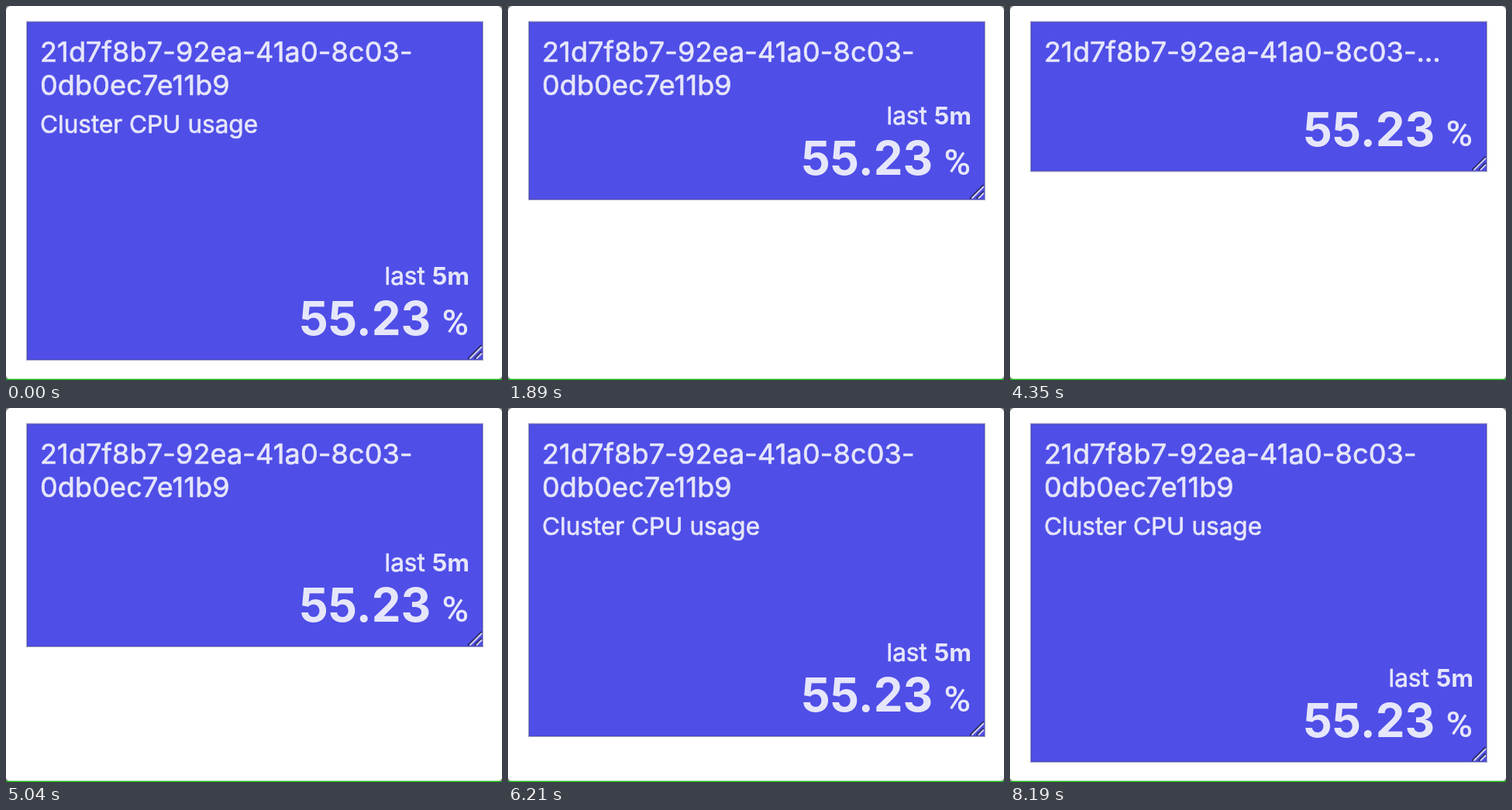
Animation, 640 px wide and 483 px high, one loop 8220 ms. Source, as an HTML page:

```html
<!DOCTYPE html>
<html lang="en">
<head>
<meta charset="utf-8">
<title>Resizable metric card</title>
<style>
  html, body { margin: 0; width: 100%; height: 100%; overflow: hidden; background: #fff; }
  svg { display: block; width: 640px; height: 483px; }
  text { font-family: Inter, sans-serif; font-optical-sizing: none; fill: #e6e6fb; stroke: #e6e6fb; stroke-width: .7px; }
  .title { font-size: 36px; letter-spacing: .15px; }
  .label { font-size: 31.5px; }
  .value { font-size: 60px; font-weight: 700; stroke: none; }
  .unit { font: 500 47px Roboto, sans-serif; stroke: none; }
  .bold { font-weight: 700; stroke: none; }
  .end { text-anchor: end; }
</style>
</head>
<body>
<svg viewBox="0 0 640 483">
  <path d="M0 0H5Q1 1 0 5ZM640 0H635Q639 1 640 5ZM0 482V478Q1 481 4 482ZM640 482V478Q639 481 636 482Z" fill="#777"/>
  <rect y="481.6" width="640" height="1.4" fill="#12b812"/>
  <rect id="card" x="27" y="20.5" width="588" fill="#4f4ee7" stroke="#44448c" stroke-opacity=".45" stroke-width="2"/>
  <text class="title" x="44" y="72">21d7f8b7-92ea-41a0-8c03-<tspan id="ellipsis">…</tspan></text>
  <text class="title" id="secondLine" x="44" y="115">0db0ec7e11b9</text>
  <text class="label" id="subtitle" x="44" y="164">Cluster CPU usage</text>
  <g id="footer">
    <text class="label end" id="period" x="598" y="-97.5">last <tspan class="bold">5m</tspan></text>
    <text class="value end" x="548.3" y="-32.5">55.23</text>
    <text class="unit end" x="597" y="-32">%</text>
    <g fill="none">
      <path d="M596 -1.5L613.5 -19M604.5 -1.5L613.5 -10.5" stroke="#2b2b62" stroke-width="1.8"/>
      <path d="M598.5 -1.5L614 -17M607 -1.5L614 -8.5" stroke="#d0d0ee" stroke-width="1.9"/>
    </g>
  </g>
</svg>
<script>
const LOOP = 8220, STEP = 30, TOP = 20.5;
const SHOW_SUBTITLE = 327, SHOW_DETAILS = 236;

// Drag path of the bottom edge: [time in ms, y]
const drag = [
  [0, 457], [780, 387], [1680, 267], [1890, 250], [2520, 216], [3060, 203],
  [3390, 199], [3600, 195], [4050, 195], [4860, 280], [5040, 308], [5700, 389],
  [6210, 424], [6540, 440], [7380, 454], [7710, 457], [LOOP, 457]
];

const el = id => document.getElementById(id);
const show = (id, visible) => el(id).setAttribute('visibility', visible ? 'visible' : 'hidden');

function tangent(i) {
  const prev = drag[i - 1], here = drag[i], next = drag[i + 1];
  if (!prev || !next || prev[1] === here[1] || next[1] === here[1]) return 0;
  return (next[1] - prev[1]) / (next[0] - prev[0]);
}

// Cubic Hermite interpolation between drag points
function bottomAt(time) {
  const i = drag.findIndex((point, k) => k > 0 && time < point[0]) - 1;
  const [t0, y0] = drag[i], [t1, y1] = drag[i + 1];
  const span = t1 - t0, u = (time - t0) / span, v = 1 - u;
  return y0 * (1 + 2 * u) * v * v + y1 * u * u * (3 - 2 * u)
    + span * u * v * (tangent(i) * v - tangent(i + 1) * u);
}

function draw(now) {
  const bottom = bottomAt(Math.floor(now % LOOP / STEP) * STEP);
  const details = bottom > SHOW_DETAILS;
  el('card').setAttribute('height', bottom - TOP);
  el('footer').setAttribute('transform', `translate(0 ${bottom})`);
  show('subtitle', bottom > SHOW_SUBTITLE);
  show('secondLine', details);
  show('period', details);
  show('ellipsis', !details);
}

const start = performance.now();
function tick() {
  draw(performance.now() - start);
  requestAnimationFrame(tick);
}
tick();
</script>
</body>
</html>
```
